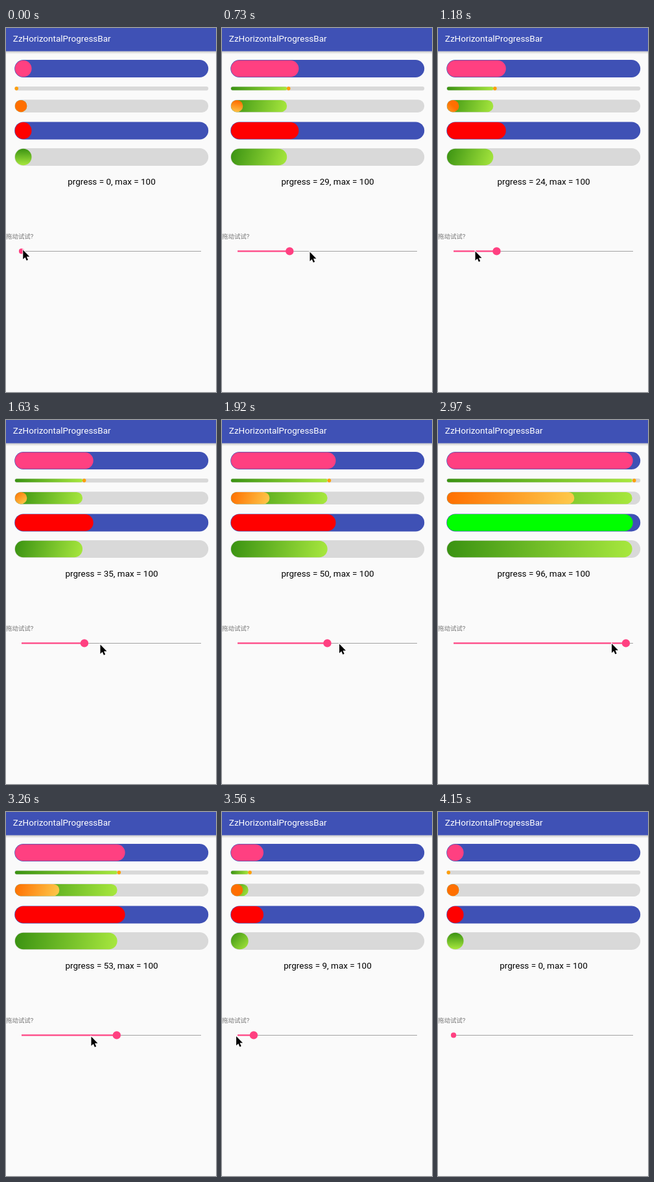
Write an HTML page that moves like this. It is 324 px wide and 560 px high and loops after 4890 ms.

```html
<!DOCTYPE html>
<html lang="en">
<head>
<meta charset="utf-8">
<title>ZzHorizontalProgressBar</title>
<style>
  html, body { margin: 0; width: 100%; height: 100%; overflow: hidden; background: #fafafa; }
  svg { display: block; }
  text { font-family: Roboto, "Noto Sans CJK SC", "Noto Sans CJK", sans-serif; }
  .blue { fill: #3f51b5; }
  .grey { fill: #d9d9d9; }
  .pink { fill: #ff4081; }
</style>
</head>
<body>
<svg width="324" height="560" viewBox="0 0 324 560">
  <defs>
    <linearGradient id="shade" x2="0" y2="1">
      <stop stop-opacity=".22"/><stop offset="1" stop-opacity="0"/>
    </linearGradient>
    <linearGradient id="leaf">
      <stop stop-color="#3a9212"/><stop offset="1" stop-color="#a8e83e"/>
    </linearGradient>
    <linearGradient id="thinG" href="#leaf" gradientUnits="userSpaceOnUse"/>
    <linearGradient id="midG" href="#leaf" gradientUnits="userSpaceOnUse"/>
    <linearGradient id="tallG" href="#leaf" gradientUnits="userSpaceOnUse"/>
    <linearGradient id="overG" gradientUnits="userSpaceOnUse">
      <stop stop-color="#ff6f00"/><stop offset="1" stop-color="#fdca4c"/>
    </linearGradient>
    <clipPath id="thinClip"><rect x="13.2" y="89" width="299" height="8"/></clipPath>
  </defs>

  <rect y="35.5" width="324" height="4.5" fill="url(#shade)"/>
  <rect class="blue" width="324" height="35.7"/>
  <text x="10.8" y="21" font-size="13.5" fill="#fff">ZzHorizontalProgressBar</text>

  <rect class="blue" x="13.2" y="49" width="299" height="27" rx="13.5"/>
  <rect class="pink" id="top"/>

  <rect class="grey" x="13.2" y="90" width="299" height="6.2" rx="3.1"/>
  <g clip-path="url(#thinClip)">
    <rect id="thin" fill="url(#thinG)"/>
    <circle id="dot" cy="93.1" r="2.8" fill="#ff9f0a"/>
  </g>

  <rect class="grey" x="13.2" y="110.2" width="299" height="19.8" rx="9.9"/>
  <rect id="mid" fill="url(#midG)"/>
  <rect id="over" fill="url(#overG)"/>

  <rect class="blue" x="13.2" y="144.4" width="299" height="27" rx="13.5"/>
  <rect id="alert"/>

  <rect class="grey" x="13.2" y="185" width="299" height="27" rx="13.5"/>
  <rect id="tall" fill="url(#tallG)"/>

  <text id="label" x="163" y="241" font-size="13.5" text-anchor="middle"></text>
  <text x="0" y="323.5" font-size="9.45" fill="#757575">拖动试试?</text>

  <rect x="24" y="343" width="277" height="1" fill="#a3a3a3"/>
  <rect class="pink" id="track" x="24" y="342.3" height="2.2"/>
  <circle class="pink" id="thumb" cy="343.4"/>
  <path id="cursor" d="M0 0V14.2L3.2 11.2L5.4 16.2L7.7 15.2L5.5 10.3H10Z"
        stroke="#fff" stroke-width="1.8" paint-order="stroke"/>
</svg>
<script>
const LOOP = 4890, LEFT = 13.9, SPAN = 297.6;
const $ = id => document.getElementById(id);
const set = (id, attrs) => {
  for (const k in attrs) $(id).setAttribute(k, attrs[k]);
};

// The screen refreshes every 150 ms; these ticks arrive 10 ms early.
const early = [1, 3, 14, 21, 25];
const startOf = k => 150 * k - 10 * early.filter(e => e <= k).length;

// tick, progress, pointer x, pointer y
const keys = [
  [0, 0, 26.3, 341.5], [1, 3, 32, 344], [2, 7, 43, 345], [3, 7, 43, 345],
  [4, 14, 85, 345], [5, 29, 135.5, 344.5], [6, 44, 165, 345], [7, 40, 118, 344],
  [8, 24, 57.5, 343.5], [9, 11, 52, 344], [10, 18, 95, 345], [11, 35, 145.5, 345.5],
  [15, 94, 287.5, 341.5], [16, 100, 310, 342], [17, 100, 330, 343], [19, 100, 330, 343],
  [20, 96, 268, 344], [22, 53, 131.5, 345.5], [24, 9, 22, 345], [25, 0, 2, 365],
  [27, 0, 95, 525], [28, 0, 95, 525]
];

function pose(tick) {
  const i = keys.findIndex(k => k[0] >= tick);
  if (i < 0) return keys[keys.length - 1];
  if (i === 0) return keys[0];
  const a = keys[i - 1], b = keys[i], u = (tick - a[0]) / (b[0] - a[0]);
  return a.map((v, j) => v + (b[j] - v) * u);
}

function pill(id, y, h, width) {
  set(id, { x: LEFT, y, width, height: h, rx: Math.min(h, width) / 2, ry: h / 2 });
}

// Gradient along the diagonal from the top left corner.
function slant(id, y, h, width) {
  set(id, { x1: LEFT, y1: y, x2: LEFT + width, y2: y + h });
}

function draw(tick) {
  const [, raw, x, y] = pose(tick);
  const p = Math.round(raw), len = SPAN * p / 100, second = SPAN * (p - 30) / 100;
  const inset = 25.6 + (SPAN - 25.6) * p / 100;

  pill("top", 49.7, 25.6, inset);
  pill("alert", 145.1, 25.6, inset);
  set("alert", { fill: p > 60 ? "#0f0" : "#f00" });

  pill("thin", 90.5, 5.2, len);
  slant("thinG", 90.5, 5.2, len);
  set("dot", { cx: 16.2 + 2.985 * p });

  pill("mid", 110.9, 18.4, Math.max(18.4, len));
  slant("midG", 110.9, 18.4, len);
  pill("over", 110.9, 18.4, Math.max(18.4, second));
  slant("overG", 110.9, 18.4, second);

  pill("tall", 185.7, 25.6, Math.max(25.6, len));
  slant("tallG", 185.7, 25.6, len);

  $("label").textContent = `prgress = ${p}, max = 100`;

  const pressed = tick > 0 && tick < 26;
  set("track", { width: 2.77 * p });
  set("thumb", { cx: 24 + 2.77 * p, r: pressed ? 6.2 : 4.1 });
  set("cursor", {
    transform: `translate(${x} ${y})`,
    visibility: tick < 28 ? "visible" : "hidden"
  });
}

let shown = -1;
function frame() {
  const t = performance.now() % LOOP;
  let tick = 0;
  while (tick < 28 && startOf(tick + 1) <= t) tick++;
  if (tick !== shown) draw(shown = tick);
  requestAnimationFrame(frame);
}
frame();
</script>
</body>
</html>
```
